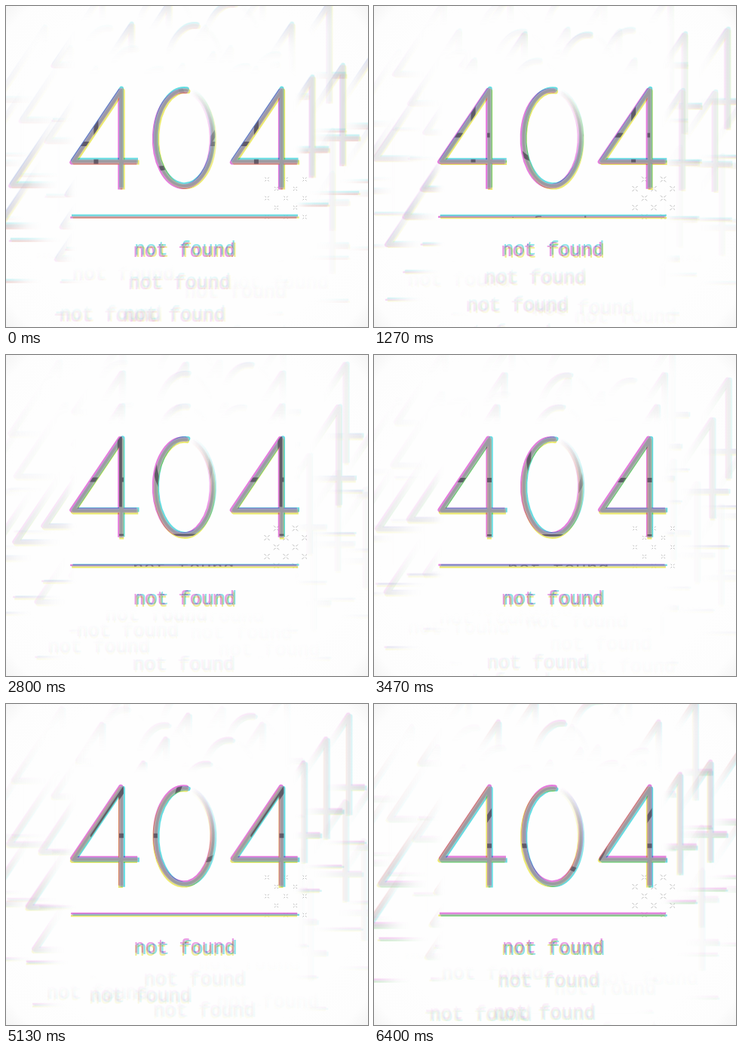
These frames come from a looping animation (480 px wide and 426 px high, 6470 ms). An HTML page with a canvas:

```html
<!DOCTYPE html>
<html>
<head>
<meta charset="utf-8">
<title>404 not found</title>
<style>
html, body { margin: 0; height: 100%; overflow: hidden; background: #fff; }
canvas { display: block; }
</style>
</head>
<body>
<canvas id="stage" width="480" height="426"></canvas>
<script>
const W = 480, H = 426, LOOP = 6470, FRAMES = 97, RAD = Math.PI / 180;
const layer = () => Object.assign(document.createElement('canvas'), { width: W, height: H }).getContext('2d');
const stage = document.getElementById('stage').getContext('2d');
const sign = layer(), ghosts = layer(), ghost = layer(), shade = layer();
const INKS = ['70,216,222', '226,98,216', '234,232,84'];

const polar = (angle, r) => [Math.cos(angle * RAD) * r, Math.sin(angle * RAD) * r];

function four(c, x) {
  c.beginPath();
  c.moveTo(x + 153, 242.5);
  c.lineTo(x + 153, 111.5);
  c.lineTo(x + 89, 206.5);
  c.lineTo(x + 175, 206.5);
  c.stroke();
}

// The zero is open at the top and fades out along its right side.
function zero(c, rgb, alpha) {
  const fade = c.createConicGradient(-82 * RAD, 236.5, 175.5);
  [[0, 0], [0.06, 0.12], [0.17, 0.4], [0.31, 0.75], [0.42, 1], [1, 1]]
    .forEach(([at, a]) => fade.addColorStop(at, `rgba(${rgb},${a * alpha})`));
  c.strokeStyle = fade;
  c.lineCap = 'round';
  c.beginPath();
  c.ellipse(236.5, 175.5, 38, 63.5, 0, -85 * RAD, -70 * RAD, true);
  c.stroke();
  c.lineCap = 'butt';
}

function drawSign(c, rgb, alpha, [dx, dy] = [0, 0]) {
  c.save();
  c.translate(dx, dy);
  c.fillStyle = c.strokeStyle = `rgba(${rgb},${alpha})`;
  c.lineWidth = 6;
  c.lineJoin = 'round';
  four(c, 0);
  four(c, 212.5);
  c.fillRect(87, 278.5, 300, 2.3);
  zero(c, rgb, alpha);
  c.fillStyle = `rgba(${rgb},${alpha * 0.75})`;
  c.font = '25px "Courier New", "Liberation Mono", monospace';
  c.fillText('not found', 170, 332);
  c.restore();
}

function buildSign(turn) {
  sign.globalCompositeOperation = 'source-over';
  sign.clearRect(0, 0, W, H);
  sign.globalCompositeOperation = 'multiply';
  INKS.forEach((ink, i) => drawSign(sign, ink, 0.85, polar(turn - 90 - 120 * i, 1.9)));
  sign.globalCompositeOperation = 'source-over';
  drawSign(sign, '184,176,190', 0.72);
}

function softBox(x, y, w, h, blur) {
  const c = layer();
  c.filter = `blur(${blur}px)`;
  c.fillRect(x, y, w, h);
  return c.canvas;
}
const centreBox = softBox(86, 84, 304, 261, 5);
const ghostBox = softBox(80, 76, 314, 279, 15);

function wipe(c, box, [dx, dy] = [0, 0]) {
  c.globalAlpha = 1;
  c.globalCompositeOperation = 'destination-out';
  c.drawImage(box, dx, dy);
  c.globalCompositeOperation = 'source-over';
}

// Ring n holds 3n copies; each keeps only the edge that faces outwards.
function buildGhosts(turn, p) {
  ghosts.clearRect(0, 0, W, H);
  const strength = 0.3 + 0.09 * Math.cos(2 * Math.PI * p);
  for (let ring = 3; ring >= 1; ring--) {
    for (let i = 0; i < 3 * ring; i++) {
      const angle = turn - 21 + 120 / ring * i;
      ghost.clearRect(0, 0, W, H);
      ghost.drawImage(sign.canvas, 0, 0);
      wipe(ghost, ghostBox, polar(angle + 180, 45));
      ghosts.globalAlpha = strength * (0.65 - 0.4 * Math.sin(2 * angle * RAD));
      ghosts.drawImage(ghost.canvas, ...polar(angle, 43.5 * ring));
    }
  }
  wipe(ghosts, centreBox);
}

const mask = layer();
drawSign(mask, '0,0,0', 1);

// One inner copy darkens the sign where both overlap.
function buildShade(turn) {
  shade.globalCompositeOperation = 'source-over';
  shade.clearRect(0, 0, W, H);
  drawSign(shade, '45,38,55', 0.55, polar(turn + 215, 41));
  shade.globalCompositeOperation = 'destination-in';
  shade.drawImage(mask.canvas, 0, 0);
}

function drawMarks(shifted) {
  const r = shifted ? 3.5 : 2.5;
  stage.save();
  stage.beginPath();
  stage.rect(340, 225, 59, 58);
  stage.clip();
  stage.strokeStyle = '#b8b8b8';
  stage.lineWidth = 1;
  stage.beginPath();
  for (let i = 0; i < 5; i++) {
    for (let j = 0; j < 5; j++) {
      if ((i + j + shifted) % 2) continue;
      const x = 346 + 12.5 * i, y = 230 + 12.5 * j;
      for (const sx of [-1, 1]) for (const sy of [-1, 1]) {
        stage.moveTo(x + sx * r, y + sy * r);
        stage.lineTo(x + sx, y + sy);
      }
    }
  }
  stage.stroke();
  stage.restore();
}

const vignette = stage.createRadialGradient(240, 213, 240, 240, 213, 322);
vignette.addColorStop(0, '#fefefe');
vignette.addColorStop(0.7, '#fdfdfd');
vignette.addColorStop(1, '#f4f4f4');

function draw(now) {
  const p = Math.floor(now % LOOP / LOOP * FRAMES + 0.05) / FRAMES;
  const turn = 120 * p, ms = p * LOOP;
  buildSign(turn);
  buildGhosts(turn, p);
  buildShade(turn);
  stage.fillStyle = vignette;
  stage.fillRect(0, 0, W, H);
  stage.drawImage(ghosts.canvas, 0, 0);
  drawMarks(ms >= 350 && ms < 3200 || ms >= 5800 ? 1 : 0);
  stage.filter = 'blur(0.4px)';
  stage.drawImage(sign.canvas, 0, 0);
  stage.filter = 'none';
  stage.drawImage(shade.canvas, 0, 0);
}

const start = performance.now();
function tick() {
  draw(performance.now() - start);
  requestAnimationFrame(tick);
}
tick();
</script>
</body>
</html>
```
